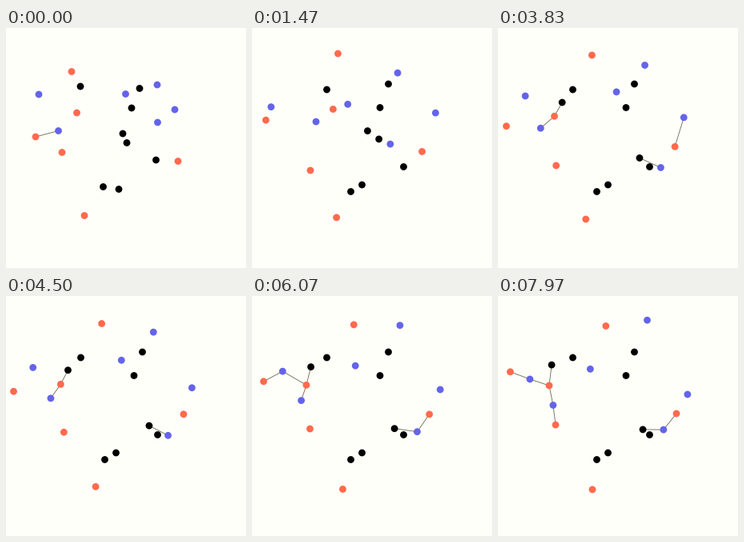
A matplotlib script that plays this animation: 300x300 px, repeating every 8 s.

```python
import math
import numpy as np
import matplotlib.pyplot as plt
from matplotlib.animation import FuncAnimation
from matplotlib.collections import LineCollection
from matplotlib.patches import Circle

SIZE, LOOP, FRAMES = 300, 8000, 250
STEP = LOOP // FRAMES
RADIUS = 4.4
PAPER, INK, RED, BLUE = "#fffffa", "#000000", "#ff6a4c", "#6464ea"
BOND = "#66664a"

# Every particle settles first, then hops, then drifts until the loop ends.
SETTLED, HOPPED = 1470, 2530
FREE, CAUGHT = 0.16, 0.78  # share of the way covered by the hop
SHAKE = 1.6

rng = np.random.default_rng(11)
fig = plt.figure(figsize=(SIZE / 100, SIZE / 100), dpi=100, facecolor=PAPER)
ax = fig.add_axes([0, 0, 1, 1])
ax.set_xlim(0, SIZE)
ax.set_ylim(SIZE, 0)
ax.axis("off")


def ease_out(u):
    return 1 - (1 - u) ** 2


def smooth(u):
    return u * u * (3 - 2 * u)


def progress(t, start, end):
    return min(max((t - start) / (end - start), 0), 1)


class Particle:
    def __init__(self, color, start, rest, end=None, reach=FREE, hop=None):
        self.start, self.rest = np.array(start), np.array(rest)
        self.pinned = end is None
        self.end = self.rest if self.pinned else np.array(end)
        self.hop = self.rest + reach * (self.end - self.rest) if hop is None else np.array(hop)
        self.amp = rng.uniform(-SHAKE, SHAKE, 2) * (not self.pinned)
        self.patch = ax.add_patch(Circle(start, RADIUS, fc=color, ec="none", zorder=2))

    def at(self, t):
        a = progress(t, 0, 1000 if self.pinned else SETTLED)
        b = progress(t, SETTLED, HOPPED)
        c = progress(t, HOPPED, LOOP)
        spot = (self.start + (self.rest - self.start) * ease_out(a)
                + (self.hop - self.rest) * smooth(b)
                + (self.end - self.hop) * c)
        # Thermal shake, zero at the start of every phase.
        return spot + self.amp * math.sin(2 * math.pi * (a + b + 2 * c))

    def move(self, t):
        self.patch.center = self.at(t)


pinned = [
    Particle(INK, (93, 73), (93.5, 77)),
    Particle(INK, (167, 75.5), (170.5, 70)),
    Particle(INK, (157, 100), (160, 99.5)),
    Particle(INK, (187.5, 165), (189.5, 173.5)),
    Particle(INK, (121.5, 198.5), (123.5, 204.5)),
    Particle(INK, (141, 201.5), (137.5, 196)),
]
movers = {
    "k1": Particle(INK, (146, 132), (144.5, 128.5), (67, 86), CAUGHT),
    "k2": Particle(INK, (151, 143.5), (158.5, 139), (181, 167), CAUGHT),
    "r1": Particle(RED, (82, 54.5), (107.5, 32), (135, 37.5)),
    "r2": Particle(RED, (88.5, 106), (101.5, 101.5), (64, 112), CAUGHT),
    "r3": Particle(RED, (37, 136), (17.5, 115), (15.5, 94.5), hop=(8.5, 131.5)),
    "r4": Particle(RED, (70, 155.5), (73, 178), (72, 161)),
    "r5": Particle(RED, (215, 166.5), (212.5, 154.5), (223, 147), CAUGHT),
    "r6": Particle(RED, (98, 234.5), (105.5, 237), (118, 242)),
    "b1": Particle(BLUE, (41, 83), (24, 98.5), (40, 104), hop=(32, 79.5)),
    "b2": Particle(BLUE, (65.5, 128.5), (80, 117), (69, 136.5), hop=(48.5, 122)),
    "b3": Particle(BLUE, (149.5, 82.5), (119.5, 95.5), (115, 91.5), hop=(158.5, 76)),
    "b4": Particle(BLUE, (189, 71), (182, 56), (186.5, 30)),
    "b5": Particle(BLUE, (211, 102), (229.5, 106), (237, 123)),
    "b6": Particle(BLUE, (189.5, 118), (173, 145), (207, 167), hop=(202, 177)),
}

# Pair, first and last moment of each bond.
BONDS = [
    ("r3", "b2", 0, 280),
    ("k1", "r2", 2200, LOOP), ("r2", "b2", 2100, LOOP),
    ("k2", "b6", 2200, LOOP), ("b6", "r5", 2300, 3000),
    ("r5", "b5", 3200, 4300), ("b6", "r5", 4500, LOOP),
    ("r2", "b1", 4700, LOOP), ("r3", "b1", 5900, LOOP),
    ("b2", "r4", 6100, LOOP),
]
bonds = ax.add_collection(LineCollection([], colors=BOND, linewidths=0.6, zorder=1))


def draw(frame):
    t = frame * STEP
    for particle in [*pinned, *movers.values()]:
        particle.move(t)
    bonds.set_segments([(movers[a].patch.center, movers[b].patch.center)
                        for a, b, first, last in BONDS if first <= t < last])
    return [bonds]


anim = FuncAnimation(fig, draw, frames=FRAMES, interval=STEP,
                     repeat=True, repeat_delay=0, blit=False)
plt.show()
```
